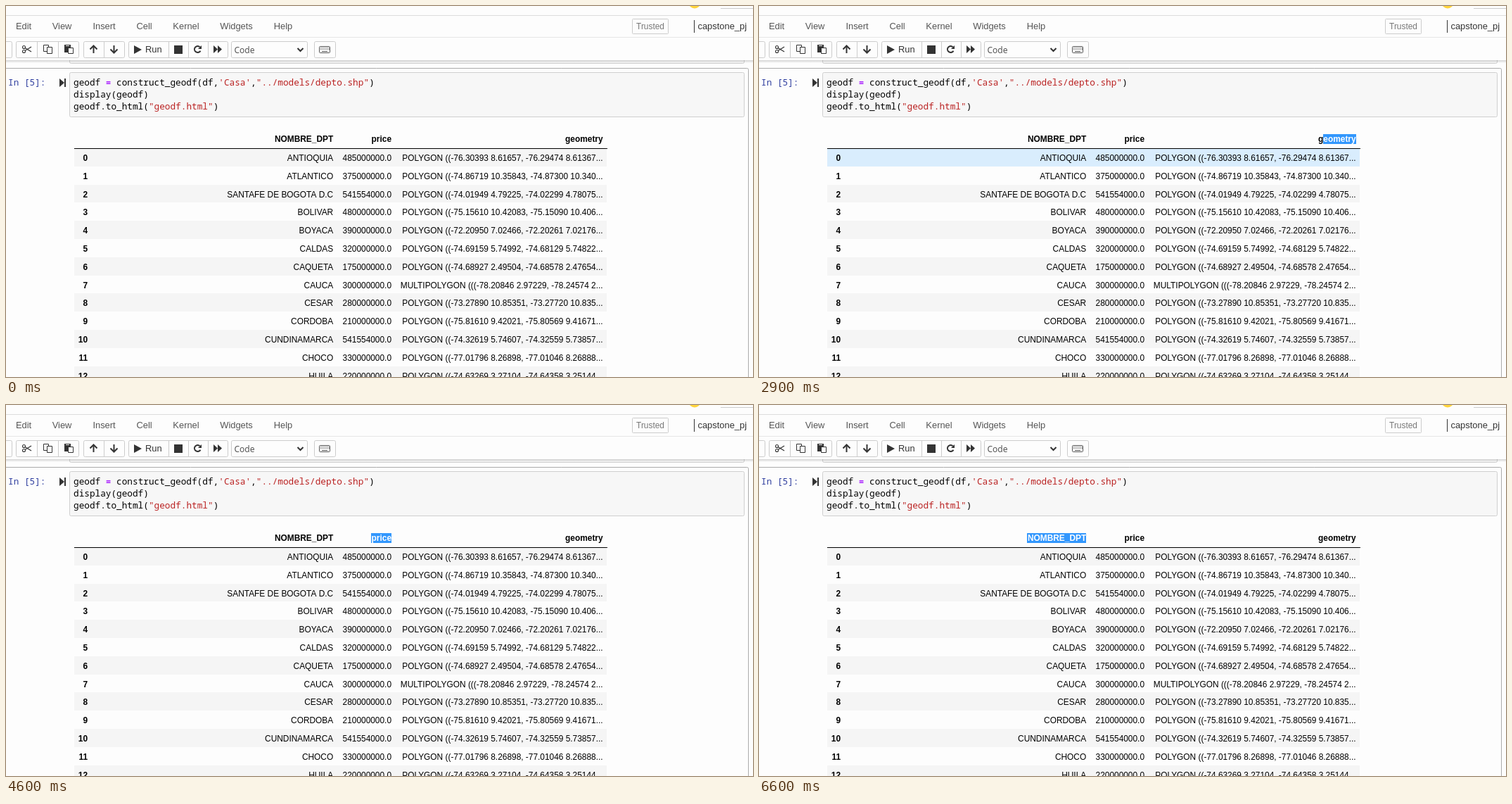
Recreate the animation shown at these times as an HTML page with a canvas. Size 1062 by 527 pixels, loop 8 s.

```html
<!DOCTYPE html>
<html lang="en">
<head>
<meta charset="utf-8">
<title>Notebook table</title>
<style>
html, body { margin: 0; width: 100%; height: 100%; overflow: hidden; background: #fdfdfd; }
canvas { display: block; width: 1062px; height: 527px; }
</style>
</head>
<body>
<canvas id="stage" width="1062" height="527"></canvas>
<script>
const ctx = document.getElementById('stage').getContext('2d');
const LOOP = 8000;
const SANS = '"Liberation Sans", Arial, sans-serif';
const MENU_FONT = '12.9px ' + SANS;
const CELL_FONT = '11.9px ' + SANS;
const CODE_FONT = '12.73px "Noto Sans Mono", monospace';
const CODE_STEP = 7.64;
const INK = '#333';
const PAPER = '#fdfdfd';
const RIGHT = [116, 465.2, 548, 848.6];
const ROW_TOP = 202, ROW_H = 25.8;

const heads = ['', 'NOMBRE_DPT', 'price', 'geometry'];
const rows = [
  'ANTIOQUIA|485000000.0|POLYGON ((-76.30393 8.61657, -76.29474 8.61367...',
  'ATLANTICO|375000000.0|POLYGON ((-74.86719 10.35843, -74.87300 10.340...',
  'SANTAFE DE BOGOTA D.C|541554000.0|POLYGON ((-74.01949 4.79225, -74.02299 4.78075...',
  'BOLIVAR|480000000.0|POLYGON ((-75.15610 10.42083, -75.15090 10.406...',
  'BOYACA|390000000.0|POLYGON ((-72.20950 7.02466, -72.20261 7.02176...',
  'CALDAS|320000000.0|POLYGON ((-74.69159 5.74992, -74.68129 5.74822...',
  'CAQUETA|175000000.0|POLYGON ((-74.68927 2.49504, -74.68578 2.47654...',
  'CAUCA|300000000.0|MULTIPOLYGON (((-78.20846 2.97229, -78.24574 2...',
  'CESAR|280000000.0|POLYGON ((-73.27890 10.85351, -73.27720 10.835...',
  'CORDOBA|210000000.0|POLYGON ((-75.81610 9.42021, -75.80569 9.41671...',
  'CUNDINAMARCA|541554000.0|POLYGON ((-74.32619 5.74607, -74.32559 5.73857...',
  'CHOCO|330000000.0|POLYGON ((-77.01796 8.26898, -77.01046 8.26888...',
  'HUILA|220000000.0|POLYGON ((-74.63269 3.27104, -74.64358 3.25144...'
].map((line, i) => [String(i), ...line.split('|')]);

// Header text selection: start time, left edge, right edge
const selection = [
  [0, 0, 0], [500, 802, 803], [700, 802, 816], [800, 802, 827],
  [1100, 802, 834], [1200, 802, 838], [1300, 802, 842], [1400, 802, 849],
  [4400, 519, 520], [4600, 519, 548],
  [6000, 381, 382], [6200, 381, 427], [6300, 381, 451], [6500, 381, 458], [6600, 381, 465]
];
const hovers = [[2900, 3000], [5200, 5400]];

function fill(x, y, w, h, color) {
  ctx.fillStyle = color;
  ctx.fillRect(x, y, w, h);
}

function text(str, x, y, font, color, align = 'left') {
  ctx.font = font;
  ctx.fillStyle = color;
  ctx.textAlign = align;
  ctx.fillText(str, x, y);
}

function box(x, y, w, h, stroke, back, r = 2) {
  ctx.beginPath();
  ctx.roundRect(x + .5, y + .5, w - 1, h - 1, r);
  ctx.fillStyle = back;
  ctx.fill();
  ctx.strokeStyle = stroke;
  ctx.lineWidth = 1;
  ctx.stroke();
}

function poly(points, color = INK) {
  ctx.beginPath();
  points.forEach(([x, y]) => ctx.lineTo(x, y));
  ctx.closePath();
  ctx.fillStyle = color;
  ctx.fill();
}

function stroke(points, width = 2, color = INK) {
  ctx.beginPath();
  points.forEach(([x, y]) => ctx.lineTo(x, y));
  ctx.strokeStyle = color;
  ctx.lineWidth = width;
  ctx.stroke();
}

function ring(x, y, r, width, from = 0, to = Math.PI * 2) {
  ctx.beginPath();
  ctx.arc(x, y, r, from, to);
  ctx.strokeStyle = INK;
  ctx.lineWidth = width;
  ctx.stroke();
}

function playIcon(x, y, w, h) {
  poly([[x, y], [x + w, y + h / 2], [x, y + h]]);
}

function arrowIcon(x, y, dir) {
  stroke([[x, y + 5.5 * dir], [x, y - 4.5 * dir]]);
  stroke([[x - 5, y], [x, y - 5 * dir], [x + 5, y]]);
}

function buttonGroup(left, right, splits = []) {
  box(left, 50, right - left, 24, '#ccc', PAPER);
  splits.forEach(x => fill(x, 50, 1, 24, '#ccc'));
}

function drawMenu() {
  ctx.beginPath();
  ctx.arc(979, -5, 8.5, 0, Math.PI * 2);
  ctx.fillStyle = '#ffd43b';
  ctx.fill();
  fill(1016, 3, 46, 1, '#ccc');
  fill(0, 13, 1062, 1, '#dcdcdc');
  fill(0, 44, 1062, 1, '#e7e7e7');
  const items = [['Edit', 25], ['View', 79.5], ['Insert', 139.5], ['Cell', 196.5],
    ['Kernel', 256], ['Widgets', 327.5], ['Help', 394]];
  items.forEach(([name, x]) => text(name, x, 33, MENU_FONT, '#555', 'center'));
  box(890, 18, 52, 22, '#ccc', PAPER, 1);
  text('Trusted', 916, 33, CELL_FONT, '#777', 'center');
  fill(978, 20, 1, 18, INK);
  text('capstone_pj', 983.5, 33, MENU_FONT, INK);
}

function drawToolbar() {
  buttonGroup(-20, 9);
  buttonGroup(14, 104, [44, 74]);
  buttonGroup(110, 169, [139]);
  buttonGroup(174, 316, [231, 259, 287]);
  box(320, 50, 109, 24, '#ccc', PAPER);
  buttonGroup(438, 469);

  // Scissors
  ring(25.5, 58.5, 2, 1.1);
  ring(25.5, 64.5, 2, 1.1);
  stroke([[27, 59.5], [36, 65]], 1.2);
  stroke([[27, 63.5], [36, 58]], 1.2);
  // Copy
  box(53, 55, 8, 10, INK, PAPER, 0);
  box(58, 58, 8, 10, INK, PAPER, 0);
  // Paste
  fill(83, 55, 9, 11, INK);
  fill(85, 56, 5, 1, PAPER);
  box(88, 59, 8, 9, INK, PAPER, 0);

  arrowIcon(124.5, 61.5, 1);
  arrowIcon(153.5, 61.5, -1);
  playIcon(182, 56, 11, 12);
  text('Run', 198, 66, MENU_FONT, INK);
  fill(239, 56, 12, 12, INK);
  ring(272.5, 61.5, 4.5, 2, .5, 5.5);
  poly([[278, 56], [278, 61], [273, 61]]);
  playIcon(295, 56, 6, 11);
  playIcon(301, 56, 6, 11);

  text('Code', 324.5, 67, '12px "Noto Sans", sans-serif', '#555');
  stroke([[414.5, 60], [418.5, 64], [422.5, 60]]);
  box(445, 57, 16, 10, '#555', PAPER, 1);
  for (let y = 59; y < 63; y += 2)
    for (let x = 447; x < 460; x += 2) fill(x, y, 1, 1, '#555');
  fill(449, 64, 8, 1, '#555');

  const shade = ctx.createLinearGradient(0, 77, 0, 81);
  shade.addColorStop(0, 'rgba(87,87,87,.25)');
  shade.addColorStop(1, 'rgba(87,87,87,0)');
  fill(0, 77, 1062, 4, shade);
}

function code(y, parts) {
  let col = 0;
  parts.forEach(([str, color = '#000', weight = '']) => {
    text(str, 96 + col * CODE_STEP, y, weight + CODE_FONT, color);
    col += str.length;
  });
}

function drawCell() {
  const red = '#ba2121';
  box(90, 60, 960, 22, '#cfcfcf', '#f7f7f7');
  box(-10, 88, 1066, 460, '#ababab', PAPER);
  box(90, 94, 960, 64, '#cfcfcf', '#f7f7f7');
  text('In [5]:', 3, 113, CODE_FONT, '#303f9f');
  playIcon(76, 103, 7, 12);
  fill(83, 103, 2, 12, INK);
  code(113, [['geodf '], ['=', '#aa22ff', 'bold '], [' construct_geodf(df,'], ["'Casa'", red],
    [','], ['"../models/depto.shp"', red], [')']]);
  code(130, [['display(geodf)']]);
  code(147, [['geodf.to_html('], ['"geodf.html"', red], [')']]);
}

function drawHeads(color) {
  heads.forEach((name, c) => text(name, RIGHT[c], 193, 'bold ' + CELL_FONT, color, 'right'));
}

function drawTable(t) {
  const hover = hovers.some(([from, to]) => t >= from && t < to);
  rows.forEach((cells, i) => {
    const top = Math.round(ROW_TOP + i * ROW_H);
    const next = Math.round(ROW_TOP + (i + 1) * ROW_H);
    if (i % 2 === 0) fill(97, top, 757, next - top, i === 0 && hover ? '#d9edfd' : '#f5f5f5');
    cells.forEach((str, c) =>
      text(str, RIGHT[c], top + 18, (c ? '' : 'bold ') + CELL_FONT, '#000', 'right'));
  });
  fill(97, 202, 758, 1, '#000');

  drawHeads('#000');
  const [, x0, x1] = selection.findLast(step => t >= step[0]);
  if (x1 > x0) {
    ctx.save();
    ctx.beginPath();
    ctx.rect(x0, 182, x1 - x0, 14);
    ctx.clip();
    fill(x0, 182, x1 - x0, 14, '#3297fd');
    drawHeads('#fff');
    ctx.restore();
  }
}

function draw(t) {
  fill(0, 0, 1062, 527, PAPER);
  drawCell();
  fill(0, 0, 1062, 77, PAPER);
  drawMenu();
  drawToolbar();
  drawTable(t);
}

const start = performance.now();
function frame() {
  draw((performance.now() - start) % LOOP);
  requestAnimationFrame(frame);
}
frame();
</script>
</body>
</html>
```
